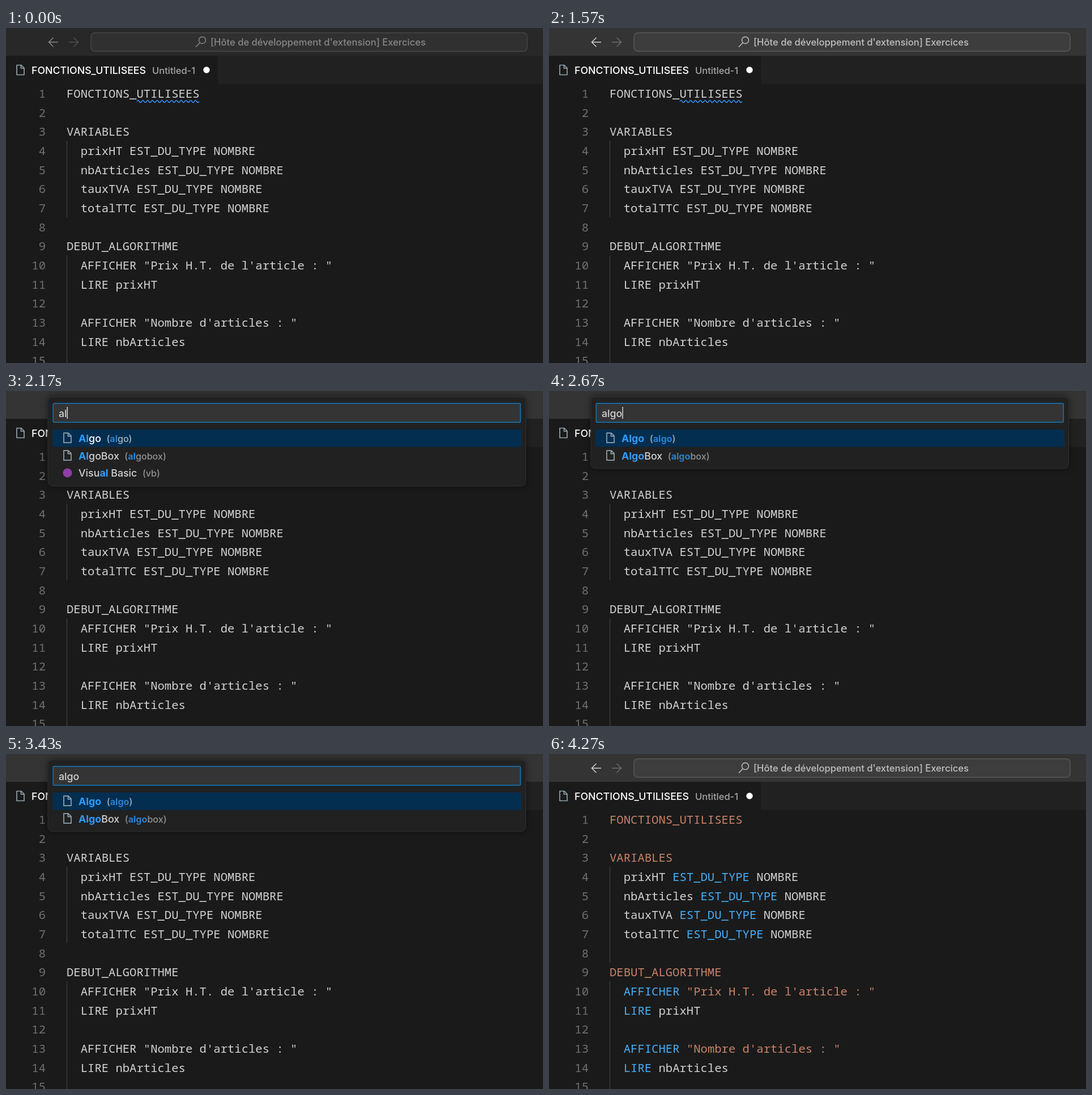
Animation, 948 px wide and 591 px high, one loop 4910 ms. Source, as an HTML page:

```html
<!DOCTYPE html>
<html lang="fr">
<head>
<meta charset="utf-8">
<style>
  html, body { margin: 0; width: 100%; height: 100%; overflow: hidden; background: #1a1a1a; }
  svg { display: block; }
  text { white-space: pre; font-family: Inter, "Open Sans", sans-serif; font-weight: 500; }
  .code { font: 500 20.58px "Noto Sans Mono", "DejaVu Sans Mono", monospace; }
  .ui { font-size: 17.8px; }
  .small { font-size: 16.5px; }
  .id { font-size: 16.1px; }
  .hit { font-weight: 700; fill: #2f9cff; }
  .id .hit { fill: #2680d0; }
  .panel { filter: drop-shadow(0 0 6px rgba(0, 0, 0, .55)); }
</style>
</head>
<body>
<svg id="stage" width="948" height="591" viewBox="0 0 948 591"></svg>
<script>
const LOOP = 4910;
const ACTIVE = 30, OPEN = 1900, MOVE = 3930, CLOSE = 4170, COLOUR = 4270;
const KEYS = [[2070, 'a'], [2140, 'al'], [2420, 'alg'], [2600, 'algo']];
const ROW = 30.88, LINE = 33.67;

const CODE = `FONCTIONS_UTILISEES

VARIABLES
  prixHT EST_DU_TYPE NOMBRE
  nbArticles EST_DU_TYPE NOMBRE
  tauxTVA EST_DU_TYPE NOMBRE
  totalTTC EST_DU_TYPE NOMBRE

DEBUT_ALGORITHME
  AFFICHER "Prix H.T. de l'article : "
  LIRE prixHT

  AFFICHER "Nombre d'articles : "
  LIRE nbArticles
`.split('\n');

// label | identifier | icon
const LANGUAGES = `Détection automatique
Algo|algo|file
AlgoBox|algobox|file
AsciiDoc|asciidoc|file
Batch|bat|terminal
BibTeX|bibtex|book
Binary|code-text-binary|file
C|c|#1b80cc
C#|csharp|#1b80cc
C++|cpp|#1b80cc
Clojure|clojure|#7fbf4d
CoffeeScript|coffeescript|#3b9bf0
Compose|dockercompose|file
CSS|css|#3b9bf0
CSV|csv|#7cb342
CSV (pipe)|csv (pipe)|file
CSV (semicolon)|csv (semicolon)|file
CSV (whitespace)|csv (whitespace)|file
Dart|dart|#3b9bf0
Handlebars|handlebars|#f57c3a
Java|java|#e5503a
JavaScript|javascript|#f5c93a
LaTeX|latex|file
Makefile|makefile|file
Markdown|markdown|file
Visual Basic|vb|#8e3fa8`.split('\n').map(row => row.split('|'));

const rect = (x, y, w, h, fill, rest = '') =>
  `<rect x="${x}" y="${y}" width="${w}" height="${h}" fill="${fill}" ${rest}/>`;
const text = (x, y, fill, content, kind = 'ui', rest = '') =>
  `<text x="${x}" y="${y}" fill="${fill}" class="${kind}" ${rest}>${content}</text>`;
const path = (d, stroke, width = 1.5, rest = '') =>
  `<path d="${d}" fill="none" stroke="${stroke}" stroke-width="${width}" ${rest}/>`;

// Icons are centred on (x, y).
function icon(kind, x, y) {
  let shape;
  if (kind === 'file') {
    shape = path('M-5.5 -8.5H1.5L6.5 -3.5V8.5H-6.5V-8.5H-5M1 -8V-3H6', '#90a4ae', 1.7);
  } else if (kind === 'terminal') {
    shape = path('M-8.5 -7.5H8.5V7.5H-8.5Z', '#f5603a', 2) + rect(-9, -8.5, 18, 4, '#f5603a') +
      path('M-5 -2L-1.5 1.2L-5 4.5M1 4.5H6', '#f5603a', 1.7);
  } else if (kind === 'book') {
    shape = rect(-5, -9, 14, 14, '#7cb342', 'rx="1.5"') + path('M-8 -5V8H5', '#7cb342', 2) +
      path('M-2 -5.5H6M-2 -2H6M-2 1.5H3', '#222', 1.6);
  } else {
    shape = `<circle r="8" fill="${kind}"/>`;
  }
  return `<g transform="translate(${x} ${y})">${shape}</g>`;
}

function colourise(line) {
  return line
    .replace(/"[^"]*"|EST_DU_TYPE|AFFICHER|LIRE|FONCTIONS_UTILISEES|VARIABLES|DEBUT_ALGORITHME/g, word => {
      const blue = /^(EST|AFF|LIRE)/.test(word);
      return `<tspan fill="${blue ? '#46b0fb' : '#ca8368'}">${word}</tspan>`;
    });
}

function editor(coloured) {
  let out = rect(0, 0, 948, 591, '#1a1a1a') + rect(374, 49, 574, 50, '#212121');
  out += icon('file', 25.5, 74) + text(45, 80.5, '#fff', 'FONCTIONS_UTILISEES') +
    text(258, 80.5, '#a6a6a6', 'Untitled-1', 'small') + '<circle cx="354" cy="74" r="5.7" fill="#fff"/>';
  CODE.forEach((line, i) => {
    const y = 123.1 + i * LINE;
    out += text(70, y, '#707070', i + 1, 'code', 'text-anchor="end"') +
      text(107, y, '#d2d2d2', coloured ? colourise(line) : line, 'code');
  });
  out += path(`M107.5 199V${coloured ? 368 : 333.5}M107.5 401.5V591`, '#404040', 1.3);
  if (!coloured) {
    out += path('M231 129.6q2.1 -3.6 4.23 0' + 't4.23 0'.repeat(25), '#3794ff', 1.5);
  }
  return out;
}

function titleBar(active, controls) {
  let out = rect(0, 0, 948, 49, active ? '#343434' : '#282828');
  if (!controls) return out;
  const ink = active ? '#c0c0c0' : '#888';
  out += path('M92 25H76M83.5 17L75.5 25L83.5 33', active ? '#d0d0d0' : '#888') +
    path('M111 25H127M119.5 17L127.5 25L119.5 33', active ? '#6c6c6c' : '#505050') +
    rect(150, 8.5, 770, 32.5, active ? '#3d3d3d' : '#303030',
      `rx="7" stroke="${active ? '#5a5a5a' : '#484848'}" stroke-width="1.4"`) +
    `<circle cx="346.5" cy="21.5" r="6" fill="none" stroke="${ink}" stroke-width="1.5"/>` +
    path('M342.2 26L335 33.5', ink) +
    text(361, 31, ink, "[Hôte de développement d'extension] Exercices", 'title', 'font-size="16.6"');
  return out;
}

function mark(word, query) {
  const at = query ? word.toLowerCase().indexOf(query) : -1;
  if (at < 0) return word;
  const end = at + query.length;
  return `${word.slice(0, at)}<tspan class="hit">${word.slice(at, end)}</tspan>${word.slice(end)}`;
}

function picker(query, selected, caret) {
  const rows = LANGUAGES.filter(([label, id = '']) => `${label}\n${id}`.toLowerCase().includes(query));
  const height = Math.min(567, 64.5 + rows.length * ROW);
  const scrolls = height === 567;

  let list = rect(82, 67.8 + selected * ROW, 828, ROW, '#042e50', 'rx="3"');
  rows.slice(0, 17).forEach(([label, id, kind], i) => {
    const on = i === selected;
    const centre = 83.4 + i * ROW + (!query && i === 1 ? 1.4 : 0);
    const name = mark(label, query);
    if (!id) {
      list += text(97, centre + 6.3, on ? '#fff' : '#d2d2d2', name);
      return;
    }
    const detail = `<tspan class="id" dx="9.5" fill="${on ? '#a5b5c1' : '#929292'}">(${mark(id, query)})</tspan>`;
    list += icon(kind, 108.5, centre - .7) +
      text(128, centre + 6.3, on ? '#fff' : '#d2d2d2', name + detail);
  });
  if (!query) {
    list += path('M82 99H904', '#3c4248', 1) +
      text(889.5, 122, '#3794ff', 'langages (identificateur)', 'ui', 'text-anchor="end"');
  }
  if (scrolls) list += rect(903.5, 67.5, 13.5, 85.5, '#464646');

  const field = query
    ? text(93, 45.5, '#d2d2d2', query, 'ui', 'id="query"')
    : text(93, 45.5, '#999', 'Sélectionner le mode de langage');
  return rect(74, 10.5, 843.5, height, '#212121', 'rx="8" class="panel"') +
    rect(74, 10.5, 843.5, height, 'none', 'rx="8" stroke="#303030"') +
    rect(83.2, 21.7, 825, 33.6, '#343434', 'rx="2" stroke="#0f7bc4" stroke-width="1.4"') + field +
    `<svg width="948" height="${height + 9.5}">${list}</svg>` +
    (caret ? rect(92.8, 28, 1.4, 21, '#e0e0e0', 'id="caret"') : '');
}

const stage = document.getElementById('stage');
let shown = '';

function render(t) {
  const open = t >= OPEN && t < CLOSE;
  const [since, query] = KEYS.filter(([at]) => t >= at).pop() || [OPEN, ''];
  const state = {
    active: t >= ACTIVE,
    coloured: t >= COLOUR,
    open,
    query: open ? query : '',
    selected: open && t >= MOVE ? 1 : 0,
    caret: open && (t - since) % 1000 < 500
  };
  const key = JSON.stringify(state);
  if (key === shown) return;
  shown = key;
  stage.innerHTML = editor(state.coloured) + titleBar(state.active, !open) +
    (open ? picker(state.query, state.selected, state.caret) : '');
  const typed = document.getElementById('query');
  const caret = document.getElementById('caret');
  if (typed && caret) caret.setAttribute('x', 93 + typed.getComputedTextLength());
}

const start = performance.now();
function tick() {
  render((performance.now() - start) % LOOP);
  requestAnimationFrame(tick);
}
tick();
</script>
</body>
</html>
```
